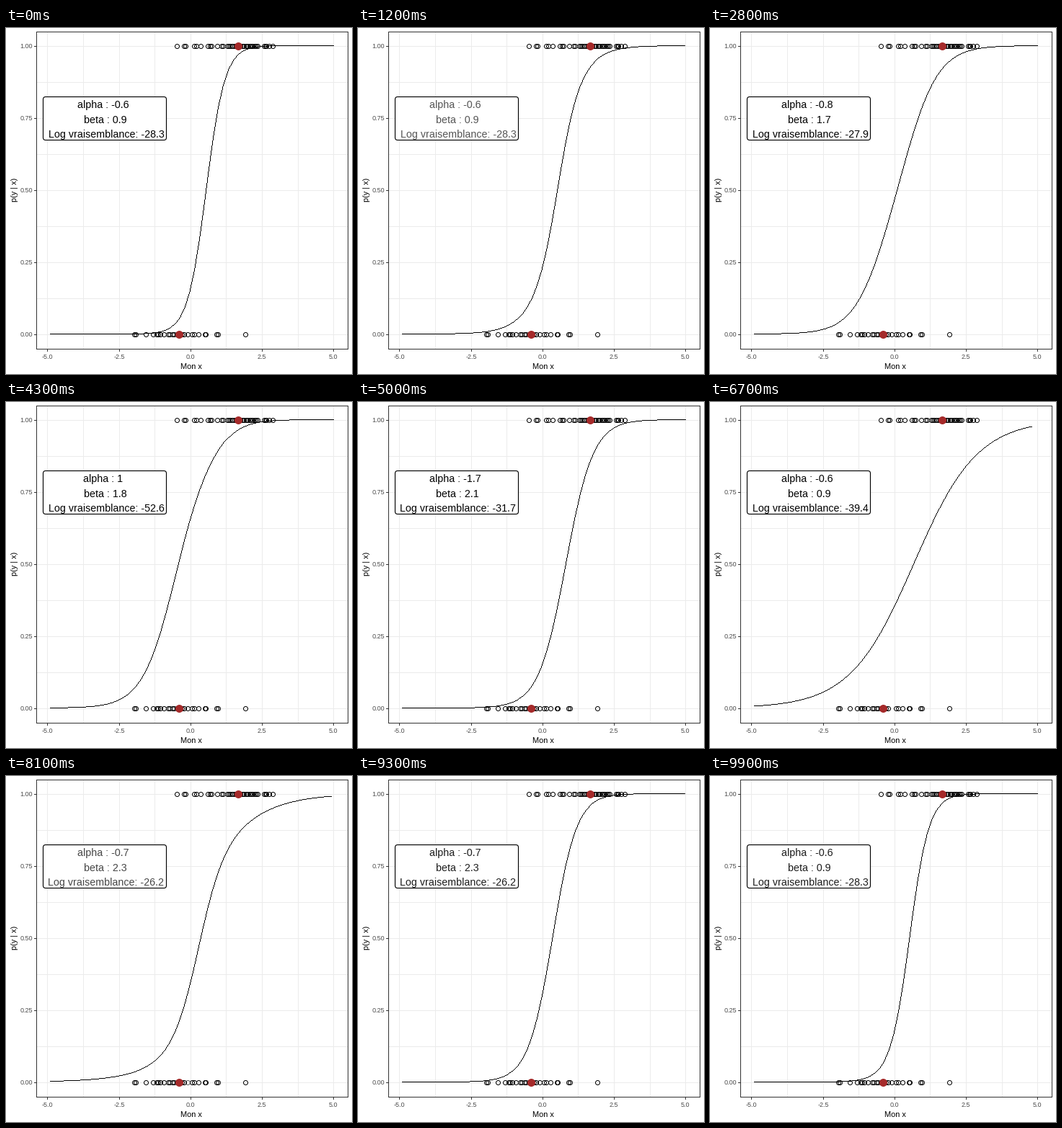
Recreate the animation shown at these times as a matplotlib script. Size 480 by 480 pixels, loop 10000 ms.

```python
import numpy as np
import matplotlib.pyplot as plt
from matplotlib.animation import FuncAnimation
from matplotlib.patches import Circle, FancyBboxPatch, Rectangle

SIZE, DPI = 480, 80
PT = 72 / DPI  # points per pixel
FRAMES, STEPS = 100, 8
STARTS = [8, 25, 42, 59, 76, 92]  # last still frame of each state

# intercept, slope, right end of the curve, label values
STATES = [
    (-1.66, 3.07, 5.0, ("-0.6", "0.9", "-28.3")),
    (-0.8, 1.7, 5.0, ("-0.8", "1.7", "-27.9")),
    (1.0, 1.77, 5.0, ("1", "1.8", "-52.6")),
    (-1.7, 2.1, 5.0, ("-1.7", "2.1", "-31.7")),
    (-0.6, 0.9, 4.8, ("-0.6", "0.9", "-39.4")),
    (-0.7, 2.3, 5.0, ("-0.7", "2.3", "-26.2")),
]
FADING = {0, 3, 4, 5}  # transitions whose label fades
SPARSE = 4             # state without the extra observation

ONES = [237, 247, 249, 261, 264, 270, 280, 283, 285, 293, 299, 301, 307, 309,
        311, 314, 317, 319, 325, 328, 330, 333, 335, 338, 340, 342, 345, 347,
        349, 358, 360, 361, 365, 370]
ZEROS = [178, 180, 194, 204, 209, 211, 214, 219, 225, 227, 231, 233, 237, 244,
         247, 258, 261, 267, 276, 277, 292, 294, 332]
EXTRA = 252

plt.rcParams["font.family"] = "Liberation Sans"


def px(x):
    return 255.75 + 39.68 * np.asarray(x)


def py(p):
    return 425 - 400 * np.asarray(p)


fig = plt.figure(figsize=(SIZE / DPI, SIZE / DPI), dpi=DPI, facecolor="white")
ax = fig.add_axes([0, 0, 1, 1])
ax.set(xlim=(0, SIZE), ylim=(SIZE, 0))
ax.axis("off")


def line(xs, ys, color, z):
    # whole coordinates snap to the pixel that starts there
    ax.plot(xs, ys, color=color, lw=PT, antialiased=False,
            solid_capstyle="butt", zorder=z)


def text(x, y, s, size, color="black", **kw):
    kw = {"ha": "center", "va": "baseline", "zorder": 8, **kw}
    return ax.text(x, y, s, fontsize=size * PT, color=color, **kw)


def dot(x, y, r, **kw):
    return ax.add_patch(Circle((x + 0.5, y + 0.5), r, **kw))


def ring(x, y):
    return dot(x, y, 3, fill=False, ec="black", lw=PT, zorder=4)


def draw_panel():
    for i in range(9):
        value = -5 + 1.25 * i
        gx = np.round(px(value))
        gy = 25 + 50 * i
        line([gx, gx], [5, 445], "#ebebeb", 1)
        line([42, 474], [gy, gy], "#ebebeb", 1)
        if i % 2 == 0:
            line([gx, gx], [445, 448], "#333333", 3)
            line([39, 42], [gy, gy], "#333333", 3)
            text(gx, 459, f"{value:.1f}", 9, "#4d4d4d")
            text(37, gy + 3.5, f"{1 - i / 8:.2f}", 9, "#4d4d4d", ha="right")
    ax.add_patch(Rectangle((42, 5), 432, 440, fill=False, ec="#333333",
                           lw=PT, antialiased=False, zorder=6))
    text(256.5, 473, "Mon x", 11)
    text(12, 224.5, "p(y | x)", 11, rotation=90, va="center")


draw_panel()
for x in ONES:
    ring(x, 25)
for x in ZEROS:
    ring(x, 425)
extra = ring(EXTRA, 425)
for x, y in ((322, 25), (240, 425)):
    dot(x, y, 5.5, color="#a52a2a", lw=0, zorder=5)
curve, = ax.plot([], [], ",", color="black", zorder=4.5)

ax.add_patch(FancyBboxPatch((51.5, 95.5), 171, 60,
                            boxstyle="round,pad=0,rounding_size=3.5",
                            fc="white", ec="black", lw=1.15 * PT, zorder=7))
label = [text(x, y, "", 14.23) for x, y in ((135, 111), (137.5, 132), (139, 152))]


def sample(state):
    a, b, right, _ = STATES[state]
    x = np.linspace(-4.9, right, 60)
    return np.array([px(x), py(1 / (1 + np.exp(-a - b * x)))])


def pixels(path):
    """Trace a path as a one-pixel line without smoothing."""
    steps = np.abs(np.diff(path)).max(axis=0)
    dist = np.concatenate([[0], np.cumsum(steps)])
    at = np.arange(0, dist[-1], 1)
    return [np.round(np.interp(at, dist, c)) for c in path]


def locate(k):
    """Return (from state, to state, progress)."""
    if k <= STARTS[0]:
        return 0, 0, 0.0
    i = max(j for j, s in enumerate(STARTS) if k > s)
    return i, (i + 1) % len(STATES), min(1.0, (k - STARTS[i]) / STEPS)


def update(k):
    old, new, t = locate(k)
    curve.set_data(*pixels((1 - t) * sample(old) + t * sample(new)))
    extra.set_alpha((1 - t) * (old != SPARSE) + t * (new != SPARSE))

    shown, alpha = (old, 1 - t) if t <= 0.5 else (new, t)
    if old not in FADING:
        alpha = 1
    # stacked translucent labels settle at this grey
    grey = str((1 - alpha) / (2 - alpha))
    names = ("alpha : ", "beta : ", "Log vraisemblance: ")
    for item, name, value in zip(label, names, STATES[shown][3]):
        item.set_text(name + value)
        item.set_color(grey)
    return [curve, extra, *label]


anim = FuncAnimation(fig, update, frames=FRAMES, interval=100,
                     repeat=True, repeat_delay=0, blit=False)
plt.show()
```
